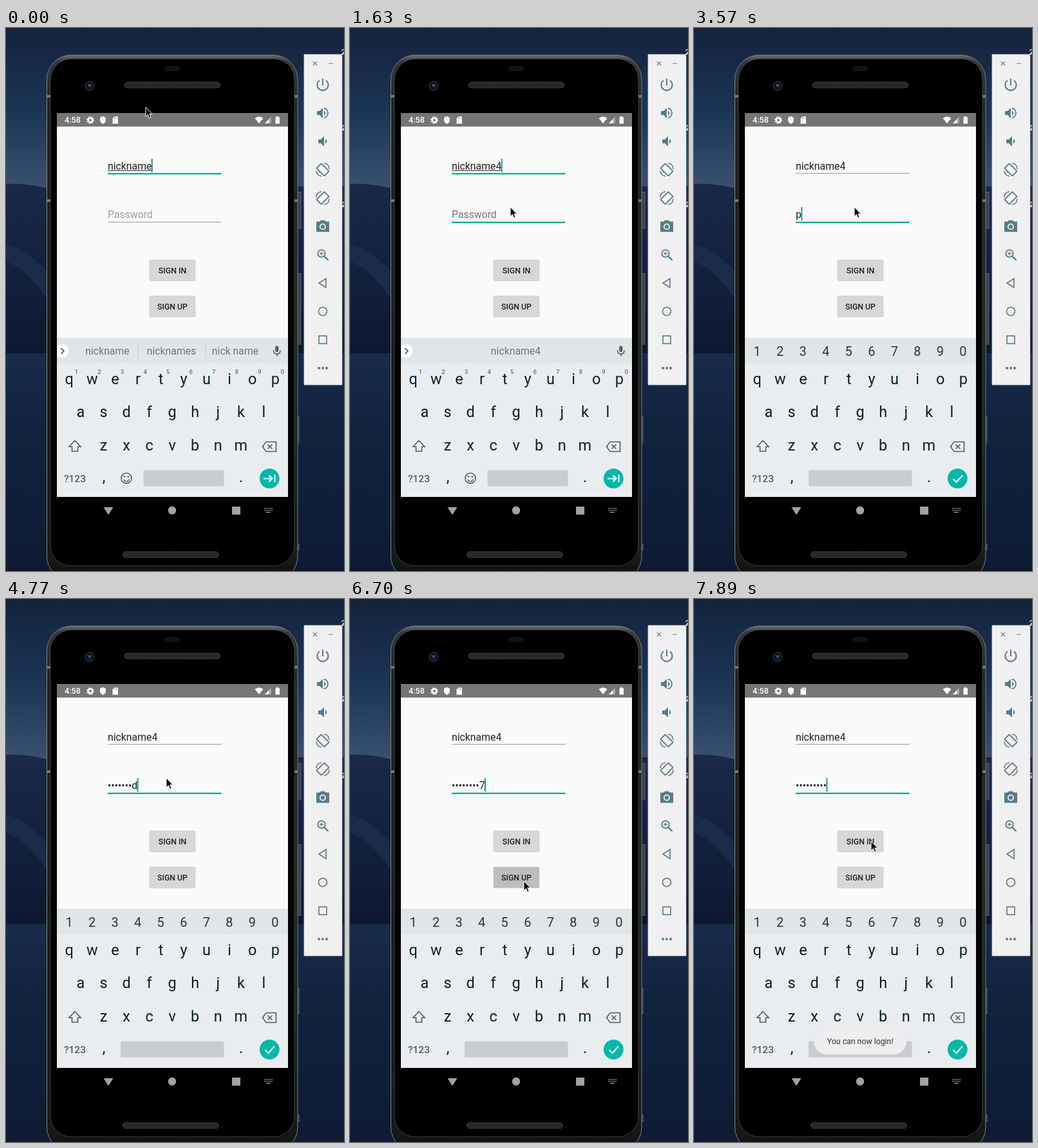
These frames come from a looping animation (525 px wide and 843 px high, 8000 ms). An HTML page:

```html
<!DOCTYPE html>
<html lang="en">
<head>
<meta charset="utf-8">
<title>Sign-in screen</title>
<style>
html, body { margin: 0; width: 100%; height: 100%; overflow: hidden; background: #111d36; }
svg { display: block; width: 100vw; height: 100vh; font-family: Roboto, sans-serif; }
.mid { text-anchor: middle; }
.field { font-size: 15.8px; fill: #212121; }
.button { font-size: 12.3px; font-weight: 500; fill: #212121; text-anchor: middle; }
.suggest { font-size: 15.8px; fill: #6a777e; text-anchor: middle; }
.key { font-size: 23.5px; fill: #08212b; text-anchor: middle; }
.digit { font-size: 20px; fill: #263a43; text-anchor: middle; }
.hint { font-size: 9.5px; font-weight: 500; fill: #65727a; text-anchor: middle; }
.line { fill: none; stroke-width: 1.6; }
.tool { stroke: #587b89; fill: none; stroke-width: 1.8; }
.tool .solid { fill: #587b89; stroke: none; }
</style>
</head>
<body>
<svg viewBox="0 0 525 843" preserveAspectRatio="none">
  <defs>
    <linearGradient id="sky" x2="0" y2="1">
      <stop offset="0" stop-color="#14233d"/><stop offset=".5" stop-color="#1b3453"/><stop offset="1" stop-color="#3a5070"/>
    </linearGradient>
    <linearGradient id="dune" x2="0" y2="1">
      <stop offset="0" stop-color="#1a2947"/><stop offset=".45" stop-color="#14223f"/><stop offset="1" stop-color="#0d1830"/>
    </linearGradient>
    <linearGradient id="ground" x2="0" y2="1">
      <stop offset="0" stop-color="#182b49"/><stop offset=".35" stop-color="#12233e"/><stop offset="1" stop-color="#0e1b33"/>
    </linearGradient>
    <linearGradient id="rim" x2="0" y2="1">
      <stop offset="0" stop-color="#6c6f73"/><stop offset=".012" stop-color="#35373a"/><stop offset=".1" stop-color="#222426"/>
      <stop offset=".95" stop-color="#1a1b1d"/><stop offset="1" stop-color="#0c0c0d"/>
    </linearGradient>
    <pattern id="mesh" width="3" height="3" patternUnits="userSpaceOnUse">
      <path d="M0 0H3V3H0Z" fill="#1b1b1b"/><path d="M0 3L3 0" stroke="#444"/>
    </pattern>
    <clipPath id="screen"><path d="M79 132H438V728H79Z"/></clipPath>
  </defs>

  <!-- Desktop -->
  <path d="M0 0H525V250H0Z" fill="url(#sky)"/>
  <path d="M0 242Q30 240 70 250L525 245V510H0Z" fill="url(#dune)"/>
  <path d="M0 335Q35 345 70 385V430Q35 375 0 362Z" fill="#1b2c4b"/>
  <path d="M0 505H525V843H0Z" fill="url(#ground)"/>
  <g fill="#fff" font-size="11" font-weight="500">
    <text x="521" y="41">2</text><text x="521" y="159">2</text><text x="521" y="278">2</text>
  </g>

  <!-- Phone -->
  <path d="M452 255h6v56h-6zM452 381h6v110h-6zM452 604h3v40h-3zM452 801h3v10h-3z" fill="#3d4046" stroke="#797d83" stroke-width=".7"/>
  <rect x="63.5" y="42" width="389.5" height="816" rx="38" fill="url(#rim)" stroke="#7d8084"/>
  <path d="M63 106h6M447 106h6M63 268h6M447 268h6" stroke="#77797c" stroke-width="4"/>
  <rect x="69" y="48" width="379" height="787" rx="32" stroke="#4a4c4f" stroke-width=".8"/>
  <rect x="246" y="59" width="24" height="8" rx="4" fill="#11111a"/>
  <circle cx="130" cy="90" r="8" fill="#1d1e23"/><circle cx="130" cy="90" r="5" fill="#0d1226"/>
  <circle cx="130" cy="89.5" r="2.3" fill="#2f4488"/><circle cx="129.5" cy="88.5" r=".8" fill="#8496cc"/>
  <g fill="url(#mesh)" stroke="#3c3c3c">
    <rect x="184" y="84" width="149" height="9" rx="4.5"/><rect x="181.5" y="813" width="149" height="9" rx="4.5"/>
  </g>
  <g fill="#a2a2a2">
    <path d="M151.5 744H166.5L159 756Z"/><circle cx="258" cy="749" r="6.2"/><path d="M351 743h13v12.5h-13z"/>
    <path d="M401 746H414M401 749H414" stroke="#a2a2a2" stroke-width="1.5" stroke-dasharray="1.6 1.2"/><path d="M404 751.3h7v1.3h-7z"/>
  </g>

  <!-- App -->
  <g clip-path="url(#screen)">
    <path d="M79 132H438V728H79Z" fill="#fafafa"/>
    <path d="M79 132H438V153H79Z" fill="#757575"/>
    <g fill="#fff">
      <text x="91" y="147" font-size="12.7" font-weight="500">4:58</text>
      <circle cx="131" cy="143" r="3.3" fill="none" stroke="#fff" stroke-width="2.6"/>
      <circle cx="131" cy="143" r="5" fill="none" stroke="#fff" stroke-width="1.6" stroke-dasharray="2 1.93"/>
      <path d="M150.500 137L155 139V142.500Q155 147 150.500 149Q146 147 146 142.500V139Z"/>
      <path d="M168.500 137.500H174V148.500H165.500V140.500Z"/>
      <path d="M168.500 139v2M170.500 139v2M172.500 139v2" stroke="#757575" stroke-width=".8"/>
      <path d="M386.500 140Q393 135 399.500 140L393 148Z"/>
      <path d="M402 148L411.500 138V148Z" fill="#b5b5b5"/><path d="M402 148L408 141.700V148Z"/>
      <path d="M418.500 138.500H420V137H423V138.500H425V148.500H418.500Z"/>
    </g>
    <text class="field" id="user" x="158" y="219.5"></text>
    <path id="compose" stroke="#333"/>
    <text class="field" id="pass" x="158" y="295"></text>
    <path id="userLine"/><path id="passLine"/>
    <path id="caret" stroke="#009688" stroke-width="1.8"/>
    <g stroke="#c9c9c9" stroke-width=".7" fill="#d6d7d7">
      <rect x="223" y="360" width="71" height="32.5" rx="1.5"/>
      <rect id="signUp" x="223" y="416" width="71" height="32.5" rx="1.5"/>
    </g>
    <text class="button" x="258.5" y="381">SIGN IN</text>
    <text class="button" x="258.5" y="437">SIGN UP</text>

    <path d="M79 481H438V728H79Z" fill="#e9edf0"/>
    <path d="M79 481H438V520.500H79Z" fill="#e0e5e8"/>
    <g id="keys"></g>
    <text x="107" y="704.5" class="mid" font-size="15.5" font-weight="500" fill="#4b5e67">?123</text>
    <g class="line" stroke="#4b5e67">
      <path d="M107 640.500L116 650H111.500V657H102.500V650H98Z"/>
      <path d="M404 642.500H419.500V657.500H404L398.500 650ZM406.500 646.500L413.500 653.500M413.500 646.500L406.500 653.500"/>
    </g>
    <g id="textMode">
      <rect x="213.5" y="686.5" width="125" height="25" rx="2" fill="#c8cdd1"/>
      <g class="line" stroke="#4b5e67">
        <circle cx="187" cy="699" r="8"/><path d="M182.700 701Q187 707 191.300 701"/>
      </g>
      <circle cx="184.2" cy="696.5" r="1.3" fill="#4b5e67"/><circle cx="189.8" cy="696.5" r="1.3" fill="#4b5e67"/>
      <circle cx="87" cy="501.5" r="10.5" fill="#fff"/>
      <path class="line" d="M85.500 497L90 501.500L85.500 506" stroke="#37474f"/>
      <rect x="418.3" y="493.5" width="5" height="9.5" rx="2.5" fill="#4b5e67"/>
      <path class="line" d="M415.500 500.500Q415.500 506 420.800 506T426 500.500M420.800 506V509.500" stroke="#4b5e67"/>
      <g id="choices">
        <text class="suggest" x="157.5" y="507">nickname</text>
        <text class="suggest" x="257" y="507">nicknames</text>
        <text class="suggest" x="356" y="507">nick name</text>
        <path d="M205.500 490V512M310 490V512" stroke="#c8ced2"/>
      </g>
      <text class="suggest" id="single" x="257.5" y="507">nickname4</text>
    </g>
    <rect id="wideSpace" x="178" y="686.5" width="160.5" height="25" rx="2" fill="#c8cdd1"/>
    <circle cx="409.3" cy="699.3" r="15.4" fill="#00b8a9"/>
    <g fill="none" stroke="#fff" stroke-width="2">
      <path id="next" d="M400 699.500H413M408.500 694.500L413.500 699.500L408.500 704.500M417.500 693.500V705.500"/>
      <path id="done" d="M402.500 700L407.500 705L417 694.500"/>
    </g>
    <g id="toast">
      <rect x="186.5" y="667" width="143.5" height="40" rx="20" fill="#eee" stroke="#e2e4e5" stroke-width=".8"/>
      <text class="mid" x="258.2" y="690.5" font-size="12.3" fill="#303030">You can now login!</text>
    </g>
  </g>

  <!-- Emulator toolbar -->
  <path d="M463 41H522V554H463Z" fill="#f0f0f0" stroke="#d2d2d2" stroke-width=".8"/>
  <path d="M477 52l6 6M483 52l-6 6M501 55h7" stroke="#6e8088" stroke-width="1.2"/>
  <g class="tool" transform="translate(492 88)">
    <path d="M0-9.500V1M-5-6.500A8.500 8.500 0 1 0 5-6.500" stroke-width="2"/>
    <g transform="translate(0 44)">
      <path class="solid" d="M-9-3H-5L0-8V8L-5 3H-9Z"/><path class="solid" d="M2-4Q7 0 2 4Z"/>
      <path d="M2-7.500A7.700 7.700 0 0 1 2 7.500"/>
    </g>
    <g transform="translate(0 88)">
      <path class="solid" d="M-7-3H-3L2-8V8L-3 3H-7Z"/><path class="solid" d="M4-4Q9 0 4 4Z"/>
    </g>
    <g id="rotate" transform="translate(0 132)">
      <rect x="-5.2" y="-8.5" width="10.4" height="17" rx="1" transform="rotate(-45)"/>
      <path d="M2-10Q10-9 10-1M-2 10Q-10 9-10 1" stroke-width="1.4"/>
    </g>
    <use href="#rotate" transform="translate(0 44) scale(-1 1)"/>
    <g transform="translate(0 219.500)">
      <path class="solid" d="M-10-7H-5L-3-9H3L5-7H10V9H-10Z"/>
      <circle r="4.1" cy="1" stroke="#f0f0f0"/>
    </g>
    <g transform="translate(0 264)">
      <circle cx="-2" cy="-2" r="5.7"/><path d="M2.500 2.500L8.500 8.500" stroke-width="2.4"/>
      <path d="M-5-2H1M-2-5V1" stroke-width="1.3"/>
    </g>
    <g stroke-width="1.6">
      <path d="M5 301V315L-6 308Z"/><circle cy="352" r="6.5"/><rect x="-6" y="390" width="12" height="12"/>
    </g>
    <g class="solid"><circle cx="-6" cy="440" r="2"/><circle cy="440" r="2"/><circle cx="6" cy="440" r="2"/></g>
  </g>

  <path id="mouse" d="M0 0V14.500L3.400 11.400L5.600 16.800L8 15.800L5.800 10.500H10.200Z" stroke="#fff"/>
</svg>
<script>
const LOOP = 8000;
const $ = id => document.getElementById(id);
const set = (id, attrs) => Object.entries(attrs).forEach(([k, v]) => $(id).setAttribute(k, v));
const show = (id, on) => { $(id).style.display = on ? '' : 'none'; };

function addKey(text, x, y, cls = 'key') {
  const node = document.createElementNS('http://www.w3.org/2000/svg', 'text');
  node.setAttribute('x', x);
  node.setAttribute('y', y);
  node.setAttribute('class', cls);
  node.textContent = text;
  $('keys').appendChild(node);
  return node;
}

function addRow(chars, x, y, cls) {
  return [...chars].map((c, i) => addKey(c, x + i * 35.55, y, cls));
}

addRow('qwertyuiop', 98.3, 553);
addRow('asdfghjkl', 116, 604);
addRow('zxcvbnm', 151.5, 655.7);
addKey(',', 152, 705);
addKey('.', 365, 705);
const hints = addRow('1234567890', 109.5, 536.5, 'hint');
const digits = addRow('1234567890', 98, 509, 'digit');

// Each track lists [start time, value]; a value holds until the next one.
const at = (track, t) => track.reduce((value, [start, next]) => t >= start ? next : value, null);

const mouseTrack = [
  [0, [217, 123]], [890, [220, 138]], [1040, [229, 180]], [1190, [240, 232]], [1340, [247, 268]], [1480, [249, 278]],
  [5810, [240, 310]], [5960, [242, 340]], [6110, [253, 382]], [6260, [264, 420]], [6400, [270, 438]],
  [7290, [271, 426]], [7440, [273, 405]], [7590, [275, 385]], [7740, [275, 376]]
];
const typedTrack = [
  [0, 0], [3570, 1], [3720, 2], [4020, 3], [4170, 4], [4470, 6], [4620, 7], [4770, 8], [5360, 9]
];
const toastTrack = [[0, 0], [6990, .35], [7140, .8], [7290, 1]];
const SECRET = 'password7';

function underline(id, y, active) {
  set(id, active
    ? { d: `M158 ${y}H334.500`, stroke: '#009688', 'stroke-width': 2 }
    : { d: `M158 ${y - .5}H334.500`, stroke: '#8b8b8b', 'stroke-width': .9 });
}

function draw(t) {
  const onPassword = t >= 1780;
  const pressed = t >= 1630;
  const typed = at(typedTrack, t);

  $('user').textContent = t < 450 ? 'nickname' : 'nickname4';
  const userEnd = 158 + $('user').getComputedTextLength();
  set('compose', { d: `M158 221.500H${userEnd}` });
  show('compose', !onPassword);

  const masked = '•'.repeat(Math.max(0, typed - 1)) + (t < 6990 ? SECRET[typed - 1] : '•');
  $('pass').textContent = typed ? masked : 'Password';
  $('pass').style.fill = typed ? '#212121' : pressed ? '#757575' : '#9b9b9b';
  const passEnd = 158 + (typed ? $('pass').getComputedTextLength() : 0);

  underline('userLine', 226.2, !onPassword);
  underline('passLine', 301.8, pressed);
  set('caret', { d: onPassword ? `M${passEnd + .4} 278V299` : `M${userEnd + .4} 203V223.500` });
  show('caret', t < 2230 || t >= 2830);

  show('textMode', !onPassword);
  show('choices', t < 590);
  show('single', t >= 590);
  hints.forEach(n => { n.style.display = onPassword ? 'none' : ''; });
  digits.forEach(n => { n.style.display = onPassword ? '' : 'none'; });
  show('wideSpace', onPassword);
  show('next', !onPassword);
  show('done', onPassword);

  set('signUp', { fill: t >= 6550 && t < 6850 ? '#bcbdbd' : '#d6d7d7' });
  set('toast', { opacity: at(toastTrack, t) });
  set('mouse', { transform: `translate(${at(mouseTrack, t)})` });
}

const start = performance.now();
function tick() {
  draw((performance.now() - start) % LOOP);
  requestAnimationFrame(tick);
}
tick();
</script>
</body>
</html>
```
